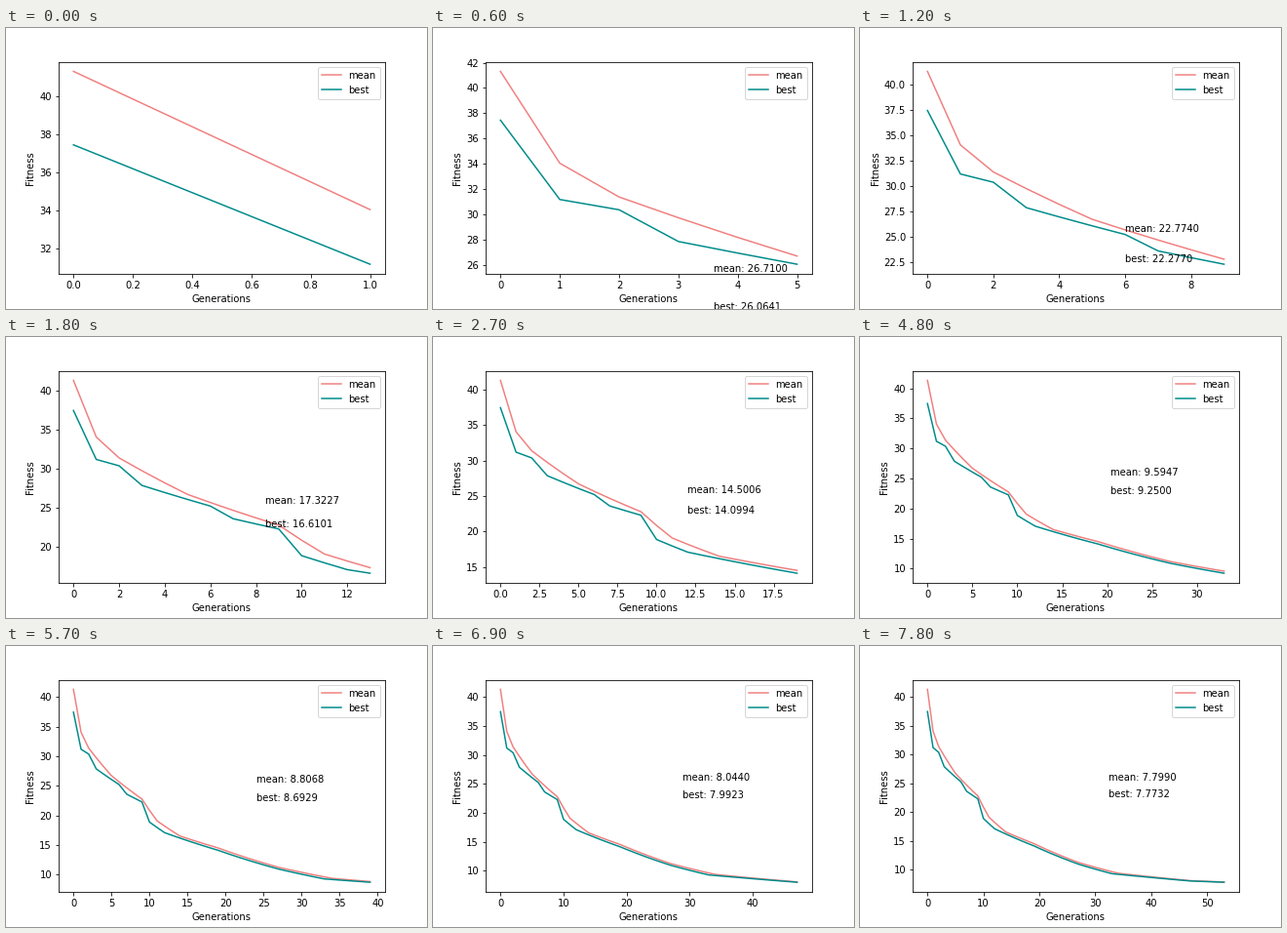
A matplotlib script for the animation above (8 s loop, 432 by 288 pixels).

```python
import matplotlib.pyplot as plt
import numpy as np
from matplotlib.animation import FuncAnimation

WIDTH, HEIGHT, DPI = 432, 288, 72
TICK_MS = 100
LOOP_MS = 8000
TICKS_PER_STEP = 3
GENERATIONS_PER_STEP = 2
STEPS = -(-LOOP_MS // (TICK_MS * TICKS_PER_STEP))
GENERATIONS = np.arange(GENERATIONS_PER_STEP * STEPS)

# Turning points of each curve, as generation: fitness.
MEAN_KEYS = {
    0: 41.3127, 1: 34.0513, 2: 31.38, 5: 26.71, 9: 22.7740, 11: 19.07, 14: 16.51,
    19: 14.5006, 27: 11.2034, 34: 9.35, 39: 8.8068, 47: 8.0440, 53: 7.7990,
}
BEST_KEYS = {
    0: 37.4538, 1: 31.1826, 2: 30.37, 3: 27.86, 6: 25.21, 7: 23.59, 9: 22.2770,
    10: 18.86, 12: 17.07, 19: 14.0994, 27: 10.9116, 33: 9.25, 39: 8.6929,
    47: 7.9923, 53: 7.7732,
}


def decay_through(keys):
    """Exponential decay from each turning point to the next."""
    return np.exp(np.interp(GENERATIONS, list(keys), np.log(list(keys.values()))))


plt.rcdefaults()
fig, ax = plt.subplots(figsize=(WIDTH / DPI, HEIGHT / DPI), dpi=DPI)
fig.subplots_adjust(left=0.125, right=0.9, bottom=0.125, top=0.88)


def make_series(name, keys, color, label_y):
    line, = ax.plot([], [], color=color, label=name)
    return name, decay_through(keys), line, ax.text(0, label_y, "")


series = [
    make_series("mean", MEAN_KEYS, "lightcoral", 25.47),
    make_series("best", BEST_KEYS, "darkcyan", 22.47),
]
ax.set_xlabel("Generations")
ax.set_ylabel("Fitness")
ax.legend(loc="upper right")


def update(tick):
    count = GENERATIONS_PER_STEP * (tick // TICKS_PER_STEP + 1)
    for name, values, line, label in series:
        line.set_data(GENERATIONS[:count], values[:count])
        # Labels are unclipped, so early ones can fall outside the axes.
        label.set_x(0.6 * count)
        label.set_text(f"{name}: {values[count - 1]:.4f}")
    ax.relim()
    ax.autoscale_view()
    return [artist for _, _, *artists in series for artist in artists]


animation = FuncAnimation(
    fig, update, frames=LOOP_MS // TICK_MS, interval=TICK_MS,
    init_func=lambda: update(0), repeat=True, repeat_delay=0,
)
plt.show()
```
